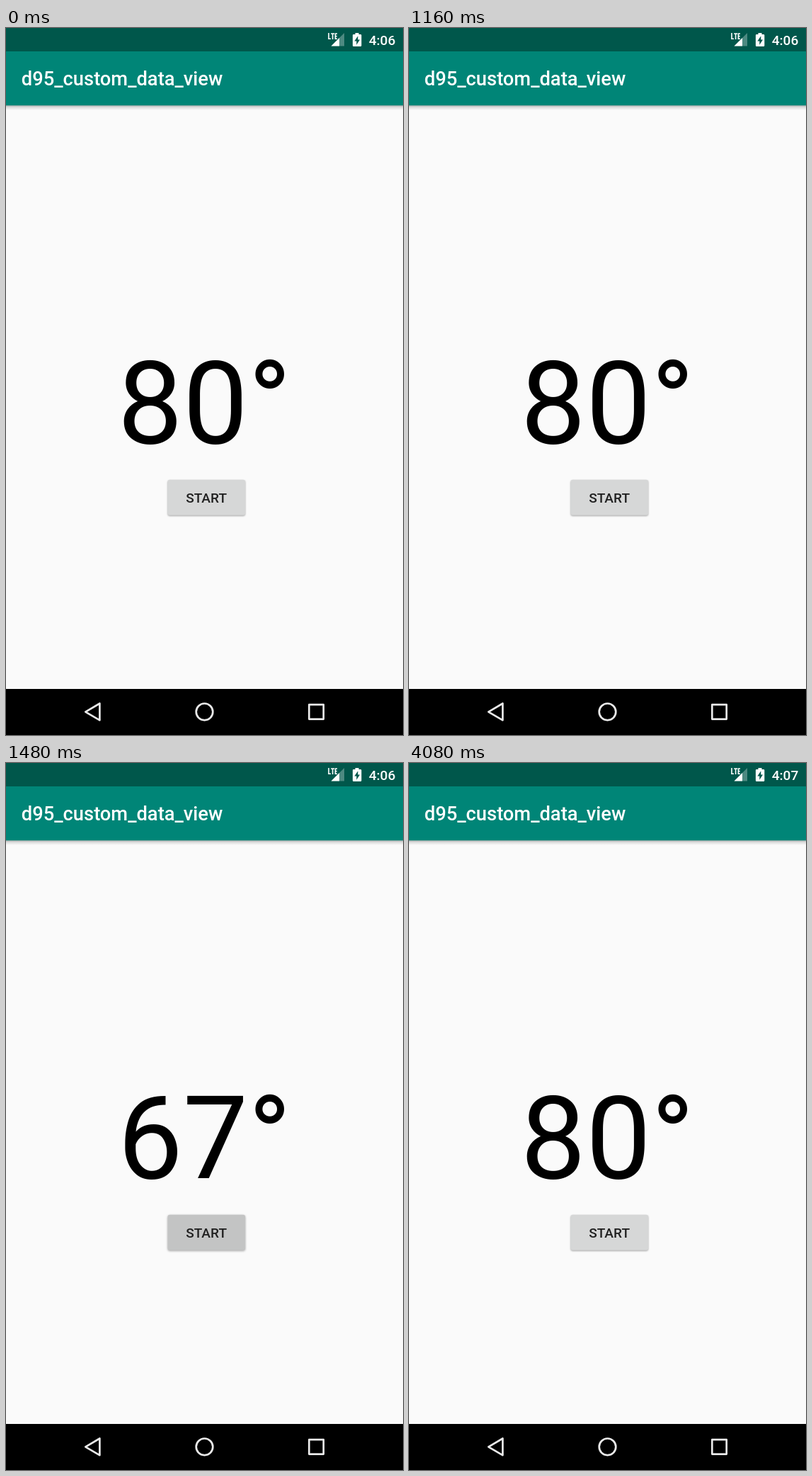
These frames come from a looping animation (561 px wide and 998 px high, 4.68 s). An HTML page:

```html
<!DOCTYPE html>
<html lang="en">
<head>
<meta charset="utf-8">
<title>Degree counter</title>
<style>
  html, body { margin: 0; width: 100%; height: 100%; overflow: hidden; background: #fafafa; }
  svg { display: block; font-family: Roboto, sans-serif; }
  .medium { font-weight: 500; }
  .nav { fill: none; stroke: #e9e9e9; stroke-width: 2.7; stroke-linejoin: round; }
</style>
</head>
<body>
<svg width="561" height="998" viewBox="0 0 561 998">
  <defs>
    <linearGradient id="shade" x1="0" y1="0" x2="0" y2="1">
      <stop offset="0" stop-color="#000" stop-opacity=".32"/>
      <stop offset=".4" stop-color="#000" stop-opacity=".12"/>
      <stop offset="1" stop-color="#000" stop-opacity="0"/>
    </linearGradient>
  </defs>
  <rect width="561" height="998" fill="#fafafa"/>

  <!-- app bar -->
  <rect y="109" width="561" height="7" fill="url(#shade)"/>
  <rect y="32" width="561" height="77.3" fill="#008577"/>
  <rect width="561" height="33" fill="#00574b"/>
  <text class="medium" x="21.8" y="81.3" font-size="27.3" fill="#fff">d95_custom_data_view</text>

  <!-- status icons -->
  <path d="M456 7V15.2H459M459.2 8H464M461.6 8V16M468 8H465.4V15.2H468M465.4 11.6H467.6" fill="none" stroke="#fff" stroke-width="1.6"/>
  <path d="M478 7V25.5H459.5Z" fill="#fff" opacity=".3"/>
  <path d="M471 14V25.5H459.5Z" fill="#fff"/>
  <path d="M493.5 7H498.5V9H501Q502.3 9 502.3 10.3V24.7Q502.3 26 501 26H491.2Q489.9 26 489.9 24.7V10.3Q489.9 9 491.2 9H493.5Z" fill="#fff"/>
  <path d="M497.3 11.2L492.4 18.6H495.3V23.8L500 16.4H497.3Z" fill="#00574b"/>
  <text id="clock" class="medium" x="550.3" y="24" font-size="19.1" text-anchor="end" fill="#fff">4:06</text>

  <text id="value" x="280.5" y="585.5" font-size="163.8" text-anchor="middle">80°</text>

  <rect id="button" x="228.6" y="637.7" width="109.4" height="50" rx="2.7" fill="#d6d7d7"/>
  <text class="medium" x="283.2" y="670" font-size="19.1" text-anchor="middle" fill="#202020">START</text>

  <!-- navigation bar -->
  <rect y="933" width="561" height="65"/>
  <path class="nav" d="M112.3 965.3L132.4 953.5V977.1Z"/>
  <circle class="nav" cx="280.5" cy="965.3" r="11.8"/>
  <rect class="nav" x="428.3" y="955.2" width="20.4" height="20.4"/>
</svg>
<script>
const LOOP = 4680, STEP = 40;
const TOP_VALUE = 80, COUNT_START = 1199, COUNT_TIME = 380;
// press strength of the button: [ms, 0..1]
const PRESS = [[0, 0], [1180, 0], [1280, 1], [1400, 1], [1840, 0], [LOOP, 0]];

const [clock, value, button] = ['clock', 'value', 'button'].map(id => document.getElementById(id));
const mix = (a, b, k) => a + (b - a) * k;

function sample(steps, t) {
  const i = steps.findIndex(s => s[0] > t);
  const [t0, v0] = steps[i - 1], [t1, v1] = steps[i];
  return mix(v0, v1, (t - t0) / (t1 - t0));
}

function count(t) {
  const k = (t - COUNT_START) / COUNT_TIME;
  if (k < 0 || k >= 1) return TOP_VALUE;
  return Math.round(TOP_VALUE * (1 - Math.cos(Math.PI * k)) / 2);
}

function draw(t) {
  const press = sample(PRESS, t);
  const grey = Math.round(mix(215, 192, press));
  clock.textContent = t < 4080 ? '4:06' : '4:07';
  value.textContent = count(t) + '°';
  button.setAttribute('fill', `rgb(${grey - 1},${grey},${grey})`);
  button.style.filter = `drop-shadow(0 ${mix(1.5, 2, press)}px ${mix(1.3, 1.7, press)}px rgba(0,0,0,.36))`;
}

const start = performance.now();
function tick() {
  const t = (performance.now() - start) % LOOP;
  draw(Math.floor(t / STEP) * STEP);
  requestAnimationFrame(tick);
}
tick();
</script>
</body>
</html>
```
